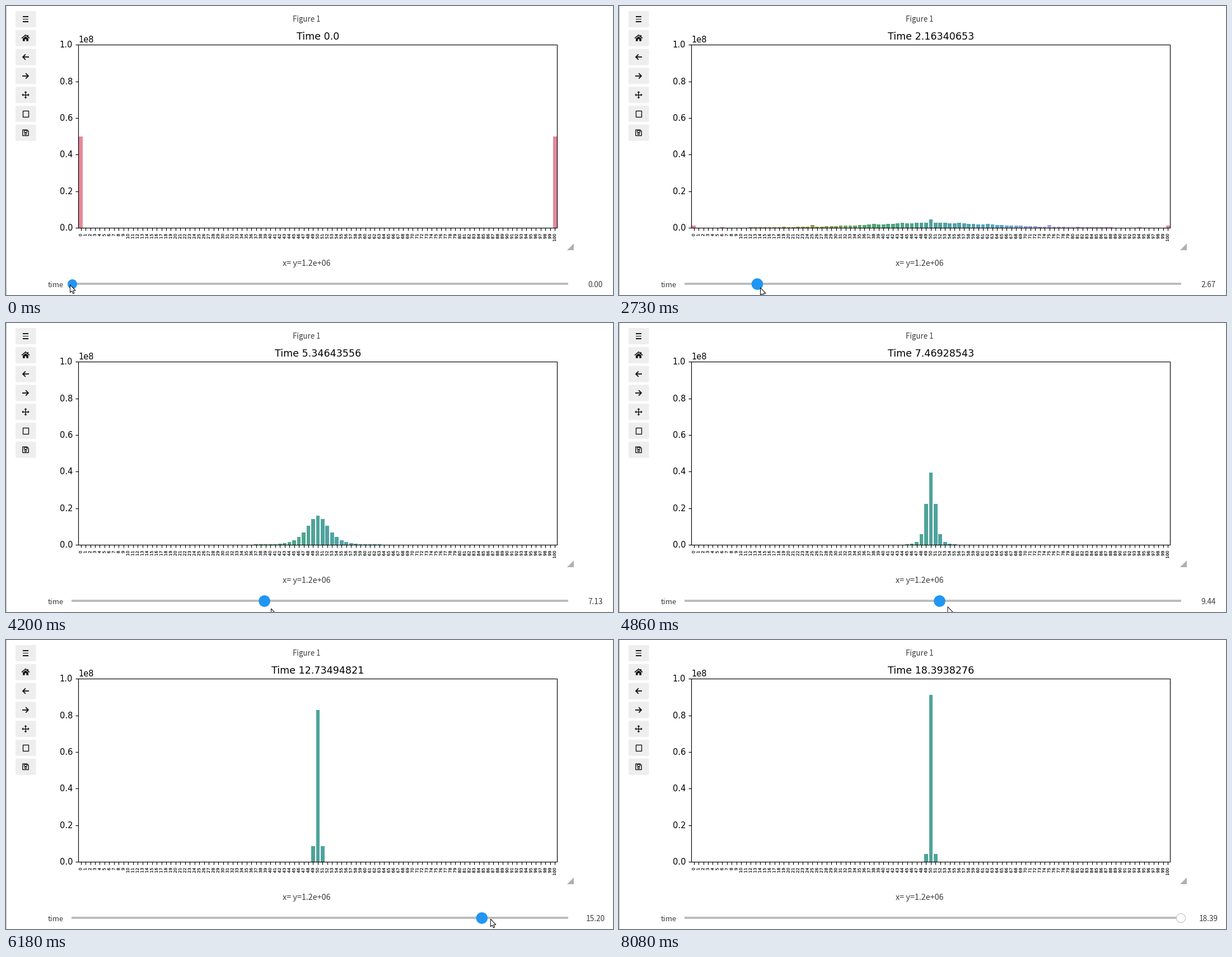
These frames come from a looping animation (1084x516 px, 8180 ms). A matplotlib script:

```python
import colorsys

import matplotlib.pyplot as plt
import numpy as np
from matplotlib.animation import FuncAnimation
from matplotlib.collections import LineCollection, PolyCollection
from matplotlib.colors import to_rgb
from matplotlib.patches import Circle, FancyBboxPatch, PathPatch, Polygon, Rectangle
from matplotlib.path import Path
from matplotlib.textpath import TextPath

W, H, DPI = 1084, 516, 64
PT = 72 / DPI                       # points per pixel
LOOP, STEP = 8180, 20
LEFT, RIGHT, TOP, BOTTOM = 129.4, 984.4, 69.3, 395.8
N = 101
SLOT = (RIGHT - LEFT) / N
UI_FONT, UI_COLOR, ICON = "Noto Sans CJK JP", "#3d3d3d", "#161616"
BLUE, TRACK = "#2196f3", "#bdbdbd"
T_MAX = 18.3938276
PRESS, DRAG, RELEASE, LEAVE = 590, 1360, 7600, 8080

# The screen refreshes about every 130 ms while the slider is dragged
REFRESH = np.interp(range(49), [0, 2, 10, 21, 31, 41, 48],
                    [DRAG, 1630, 2730, 4200, 5490, 6810, 7680])
UPDATES = np.concatenate([[0, PRESS], REFRESH, [LEAVE]])

# ms, slider value, plotted time (lags behind), pointer offset, pointer y
KEYS = np.array([
    (PRESS, 0, 0, -4, 498),
    (DRAG, 0.06, 0, -1, 498),
    (1630, 0.36, 0, 3, 498),
    (2730, 2.67, 2.16340653, 5.5, 503),
    (4200, 7.13, 5.34643556, 12, 510),
    (4980, 9.92, 7.91360284, 15, 506),
    (5490, 12.66, 9.98051478, 18, 499.5),
    (6810, 17.74, 15.48938163, 13, 497),
    (7080, T_MAX, 16.39072564, 16, 498),
    (7680, T_MAX, T_MAX, 35, 530),
])


def pose(t):
    return [np.interp(t, KEYS[:, 0], column) for column in KEYS.T[1:]]


def rate(p):
    """Random pairs average their values; odd sums split up and down."""
    sums = np.convolve(p, p)
    mixed = sums[::2].copy()
    mixed[:-1] += sums[1::2] / 2
    mixed[1:] += sums[1::2] / 2
    return 2 * (mixed - p)


def solve(h):
    p = np.zeros(N)
    p[[0, -1]] = 0.5
    states = [p]
    for _ in range(int(T_MAX / h) + 1):
        p = p + h * rate(p + h / 2 * rate(p))
        p = p / p.sum()             # keeps rounding errors from growing
        states.append(p)
    return states


def bar_colors():
    wheel = "#f77189 #ce9032 #97a431 #32b166 #36ada4 #39a7d0 #a48cf4 #f561dd".split()
    rgb = np.array([to_rgb(c) for c in wheel])
    hues = np.arange(N) * len(wheel) / N
    mixed = np.column_stack([np.interp(hues, range(8), c, period=8) for c in rgb.T])
    colors = []
    for c in mixed:
        hue, light, sat = colorsys.rgb_to_hls(*c)
        colors.append((*colorsys.hls_to_rgb(hue, light, sat * 0.75), 0.95))
    return colors


H_ODE = 0.02
STATES = solve(H_ODE)

fig = plt.figure(figsize=(W / DPI, H / DPI), dpi=DPI, facecolor="white")
ax = fig.add_axes([0, 0, 1, 1])
ax.set_xlim(0, W)
ax.set_ylim(H, 0)
ax.axis("off")


def label(x, y, s, px, font="DejaVu Sans", color="black", ha="center"):
    return ax.text(x, y, s, fontsize=px * PT, family=font, color=color,
                   ha=ha, va="baseline", zorder=6)


def ui_label(x, y, s, px):
    return label(x, y, s, px, UI_FONT, UI_COLOR)


def fill(points, color=ICON):
    ax.add_patch(Polygon(points, closed=True, fc=color, ec="none", zorder=4))


def stroke(points, lw, closed=False):
    ax.add_patch(Polygon(points, closed=closed, fill=False, ec=ICON,
                         lw=lw * PT, joinstyle="miter", zorder=4))


def box(x, y, w, h):
    return [(x, y), (x + w, y), (x + w, y + h), (x, y + h)]


def mirrored(x, half):
    """Close a left-hand outline with its reflection about x."""
    return half + [(2 * x - px, py) for px, py in reversed(half)]


def menu_icon(x, y):
    for d in (-4.3, 0, 4.3):
        fill(box(x - 5.4, y + d - 0.9, 10.8, 1.8))


def home_icon(x, y):
    stroke([(x - 7, y + 0.3), (x, y - 5.6), (x + 7, y + 0.3)], 1.6)
    fill(mirrored(x, [(x - 1.3, y + 2), (x - 1.3, y + 5.5), (x - 5, y + 5.5),
                      (x - 5, y + 0.8), (x, y - 3.2)]))
    fill(box(x + 3.2, y - 5.4, 1.8, 3.8))


def arrow_icon(x, y, s):
    stroke([(x + 4.6 * s, y), (x - 5.6 * s, y)], 1.9)
    stroke([(x + 0.2 * s, y - 4.7), (x + 4.9 * s, y), (x + 0.2 * s, y + 4.7)], 1.9)


def pan_icon(x, y):
    for ux, uy in ((1, 0), (-1, 0), (0, 1), (0, -1)):
        stroke([(x, y), (x + 5 * ux, y + 5 * uy)], 1.5)
        fill([(x + 6.8 * ux, y + 6.8 * uy),
              (x + 4 * ux - 2.6 * uy, y + 4 * uy + 2.6 * ux),
              (x + 4 * ux + 2.6 * uy, y + 4 * uy - 2.6 * ux)])


def zoom_icon(x, y):
    stroke(box(x - 5.2, y - 5.2, 10.4, 10.4), 1.4, True)


def save_icon(x, y):
    r, cut = 5.2, 2.6
    stroke([(x - r, y - r), (x + cut, y - r), (x + r, y - cut),
            (x + r, y + r), (x - r, y + r)], 1.4, True)
    stroke(box(x - 2.9, y - 4.7, 5, 3.2), 1.1, True)
    ax.add_patch(Circle((x, y + 1.9), 1.6, fill=False, ec=ICON,
                        lw=1.2 * PT, zorder=4))


def draw_toolbar():
    icons = [menu_icon, home_icon, lambda x, y: arrow_icon(x, y, -1),
             lambda x, y: arrow_icon(x, y, 1), pan_icon, zoom_icon, save_icon]
    for k, icon in enumerate(icons):
        y = 23.5 + 33.8 * k
        ax.add_patch(FancyBboxPatch((18.5, y - 13), 33.5, 26,
                                    boxstyle="round,pad=1.5,rounding_size=2",
                                    fc="#eeeeee", ec="none", zorder=2))
        icon(35, y)


def turned(s, cx, size=7.29):
    """Outline of a label that reads upwards, ending just under the axis."""
    p = TextPath((0, 0), s, size=size)
    px, py = p.vertices.T
    x = cx - 0.9 + 0.365 * size - py
    y = BOTTOM + 10.9 + 0.636 * size * len(s) - px
    return Path(np.column_stack([x, y]), p.codes)


def draw_axes():
    centers = LEFT + SLOT * (np.arange(N) + 0.5)
    ticks = [[(c, BOTTOM), (c, BOTTOM + 5.1)] for c in centers]
    for k in range(6):
        y = BOTTOM + (TOP - BOTTOM) * k / 5
        ticks.append([(LEFT - 5.1, y), (LEFT, y)])
        label(LEFT - 10.2, y + 5.2, f"{k / 5:.1f}", 14.58, ha="right")
    ax.add_collection(LineCollection(ticks, colors="black", linewidths=1.17 * PT,
                                     snap=True, zorder=5), autolim=False)
    ax.add_patch(Rectangle((LEFT, TOP), RIGHT - LEFT, BOTTOM - TOP, fill=False,
                           ec="black", lw=1.17 * PT, zorder=5))
    names = [turned(str(i), c) for i, c in enumerate(centers)]
    ax.add_patch(PathPatch(Path.make_compound_path(*names), fc="black",
                           ec="black", lw=0.2 * PT, zorder=6))
    label(LEFT, 64.6, "1e8", 14.58, ha="left")


def bar_shapes(p):
    x0 = LEFT + SLOT * (np.arange(N) + 0.1)
    x1 = x0 + 0.8 * SLOT
    y1 = BOTTOM - p * (BOTTOM - TOP)
    y0 = np.full(N, BOTTOM)
    return np.stack([np.column_stack(c) for c in
                     ((x0, y0), (x0, y1), (x1, y1), (x1, y0))], axis=1)


draw_toolbar()
draw_axes()
fill(box(0, 0, 1, H), "#b4b4b4")
fill([(1013.5, 423.5), (1013.5, 435.5), (1001.5, 435.5)], "#b0b0b0")
fill(box(117, 494, 887, 4), TRACK)
ui_label(536.3, 28, "Figure 1", 13.3)
ui_label(536.5, 464, "x= y=1.2e+06", 14.4)
ui_label(88.3, 502, "time", 13.2)

title = label((LEFT + RIGHT) / 2, 60.4, "", 17.5)
value = ui_label(1052.3, 502, "", 13.6)
bars = PolyCollection(bar_shapes(STATES[0]), facecolors=bar_colors(),
                      edgecolors="none", linewidths=0, snap=True, zorder=3)
ax.add_collection(bars, autolim=False)
handle = Circle((118.5, 496.5), 8.5, zorder=7)
ax.add_patch(handle)
ARROW = np.array([(0, 0), (0, 13.6), (3.1, 10.8), (5.2, 15.6), (7.3, 14.6),
                  (5.3, 10), (9.6, 10)])
cursor = Polygon(ARROW, closed=True, fc="white", ec="black", lw=1 * PT,
                 joinstyle="miter", zorder=8)
ax.add_patch(cursor)


def draw(i):
    t = i * STEP + STEP / 2 + 1
    now = UPDATES[np.searchsorted(UPDATES, t) - 1]
    v, shown, dx, y = pose(now)

    digits = f"{shown:.8f}".rstrip("0")
    title.set_text("Time " + (digits + "0" if digits.endswith(".") else digits))
    bars.set_verts(bar_shapes(STATES[int(round(shown / H_ODE))]))

    x = 118.5 + 885 * v / T_MAX
    value.set_text(f"{v:.2f}")
    idle = now >= LEAVE
    pressed = PRESS <= now < RELEASE
    handle.center = (x, 496.5)
    handle.set_radius(10.3 if pressed else 8 if idle else 8.5)
    handle.set_facecolor("white" if idle else BLUE)
    handle.set_edgecolor(TRACK if idle else "none")
    handle.set_linewidth(PT if idle else 0)

    cursor.set_xy(ARROW + (x + dx, y))
    return title, bars, value, handle, cursor


anim = FuncAnimation(fig, draw, frames=LOOP // STEP, interval=STEP,
                     repeat=True, repeat_delay=0, blit=False)
plt.show()
```
